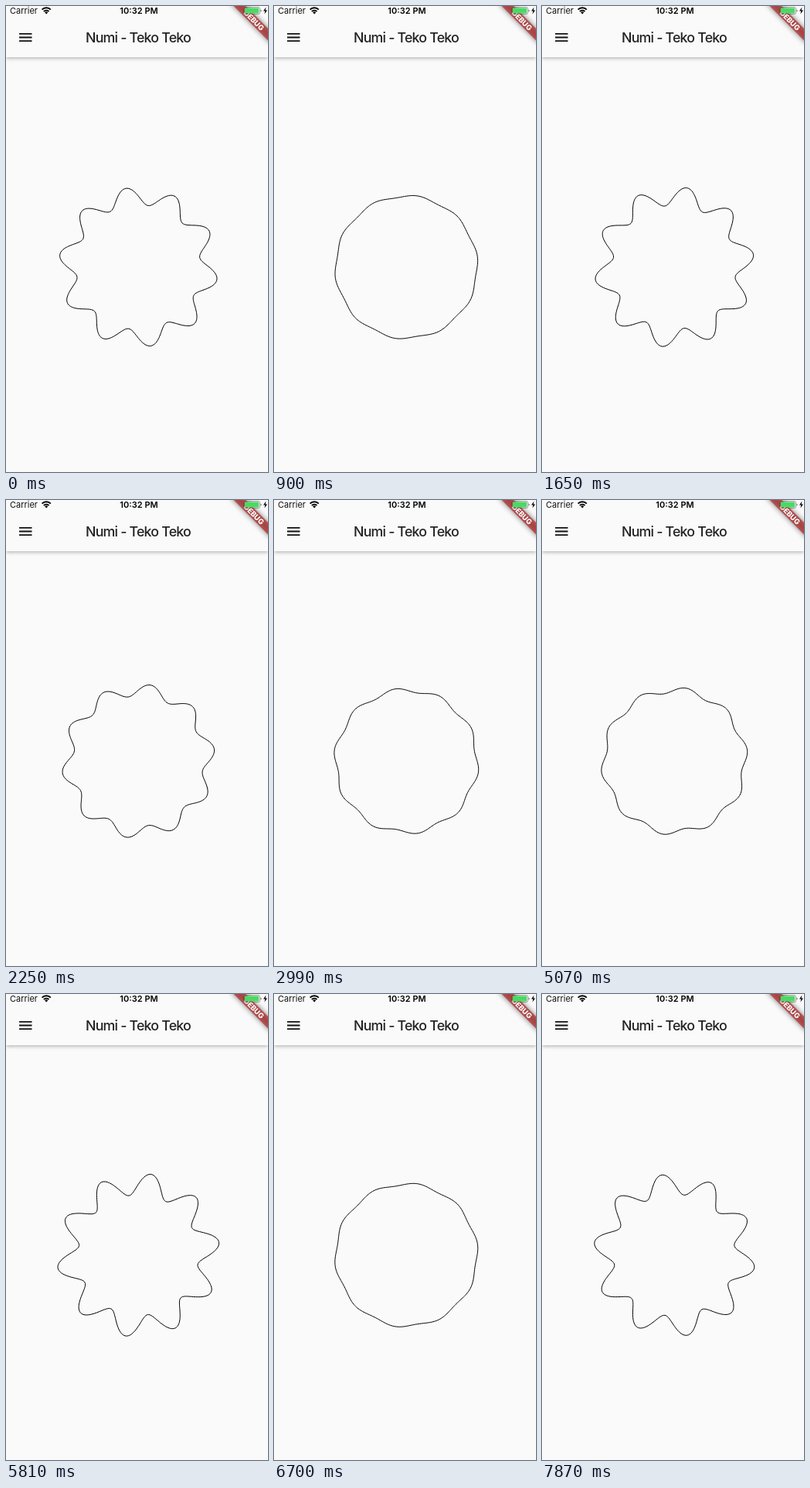
An HTML page for the animation above (8 s loop, 339 by 601 pixels).

```html
<!DOCTYPE html>
<html lang="en">
<head>
<meta charset="utf-8">
<title>Wobbling ring</title>
<style>
  html, body { margin: 0; width: 100%; height: 100%; overflow: hidden; background: #fafafa; }
  #bar {
    position: absolute; left: 0; top: 0; width: 339px; height: 66px; background: #fafafa;
    box-shadow: 0 2px 4px -1px rgba(0,0,0,.16), 0 3px 4px rgba(0,0,0,.08), 0 1px 7px rgba(0,0,0,.07);
  }
  svg { position: absolute; left: 0; top: 0; display: block; }
  text { font-family: Inter, Roboto, sans-serif; }
</style>
</head>
<body>
<div id="bar"></div>
<svg width="339" height="601" viewBox="0 0 339 601">
  <defs>
    <filter id="blur" x="-50%" y="-200%" width="200%" height="500%">
      <feGaussianBlur stdDeviation="4"/>
    </filter>
  </defs>

  <path id="ring" fill="none" stroke="#000" stroke-width="1"/>

  <!-- app bar -->
  <path transform="translate(14.3 29.5) scale(.915)" fill="#111"
        d="M3 18h18v-2H3zM3 13h18v-2H3zM3 6v2h18V6z"/>
  <text x="171" y="47" text-anchor="middle" font-size="17.8" font-weight="500"
        fill="#222" letter-spacing="-.8">Numi - Teko Teko</text>

  <!-- debug ribbon -->
  <g transform="translate(342.8 -3.5) rotate(45) scale(.915)">
    <rect x="-40" y="28" width="80" height="12" fill="#000" fill-opacity=".5" filter="url(#blur)"/>
    <rect x="-40" y="28" width="80" height="12" fill="#b71c1c" fill-opacity=".627"/>
    <text x="0" y="37.7" text-anchor="middle" font-size="10.2" font-weight="800" fill="#fff">DEBUG</text>
  </g>

  <!-- status bar -->
  <text x="5" y="10" font-size="11" fill="#111">Carrier</text>
  <g fill="none" stroke="#000" stroke-width="2">
    <path d="M46.6 4.6a8 8 0 0 1 11.2 0M48.9 7a4.8 4.8 0 0 1 6.6 0"/>
    <path d="M50.2 8.3a2.8 2.8 0 0 1 4 0L52.2 10.4z" fill="#000" stroke="none"/>
  </g>
  <text x="172" y="10" text-anchor="middle" font-size="11" font-weight="600" fill="#000">10:32 PM</text>
  <rect x="307.5" y="1.5" width="21" height="9" rx="2" fill="none" stroke="#444" stroke-opacity=".6" stroke-width=".8"/>
  <rect x="308.8" y="2.6" width="18.4" height="6.8" rx="1" fill="#4cd964"/>
  <path d="M329.6 4.4a1.8 1.8 0 0 1 0 3.2z" fill="#444"/>
  <path d="M336.4 1.6L333 6.6h2.3l-.9 3.8 3.6-5h-2.4z" fill="#000"/>
</svg>
<script>
  const LOOP = 8000, PERIOD = 4000, PHASE = 197;
  const CENTER = { x: 171.3, y: 336.8 }, RADIUS = 91.6, SWING = 14, LOBES = 10;
  const ring = document.getElementById('ring');

  // The picture holds for about 150 ms, slightly less later in the loop.
  const poseTimes = Array.from({ length: 54 }, (_, i) => {
    const drift = 80 * (Math.max(0, i - 15) / 38) ** 1.3;
    return 150 * i - 10 * Math.round(drift / 10);
  });

  // Triangle wave: the lobes swap in and out at constant speed.
  function swingAt(time) {
    const phase = (time + PHASE) / PERIOD % 1;
    return SWING * (4 * Math.abs(phase - 0.5) - 1);
  }

  function ringPath(swing) {
    const points = [];
    for (let degree = 0; degree < 360; degree++) {
      const angle = degree * Math.PI / 180;
      const r = RADIUS + swing * Math.sin(LOBES * angle);
      const x = CENTER.x + r * Math.cos(angle);
      const y = CENTER.y + r * Math.sin(angle);
      points.push(x.toFixed(2) + ' ' + y.toFixed(2));
    }
    return 'M' + points.join('L') + 'Z';
  }

  function draw() {
    const time = performance.now() % LOOP;
    const pose = poseTimes.filter(start => start <= time).pop();
    ring.setAttribute('d', ringPath(swingAt(pose)));
    requestAnimationFrame(draw);
  }
  draw();
</script>
</body>
</html>
```
